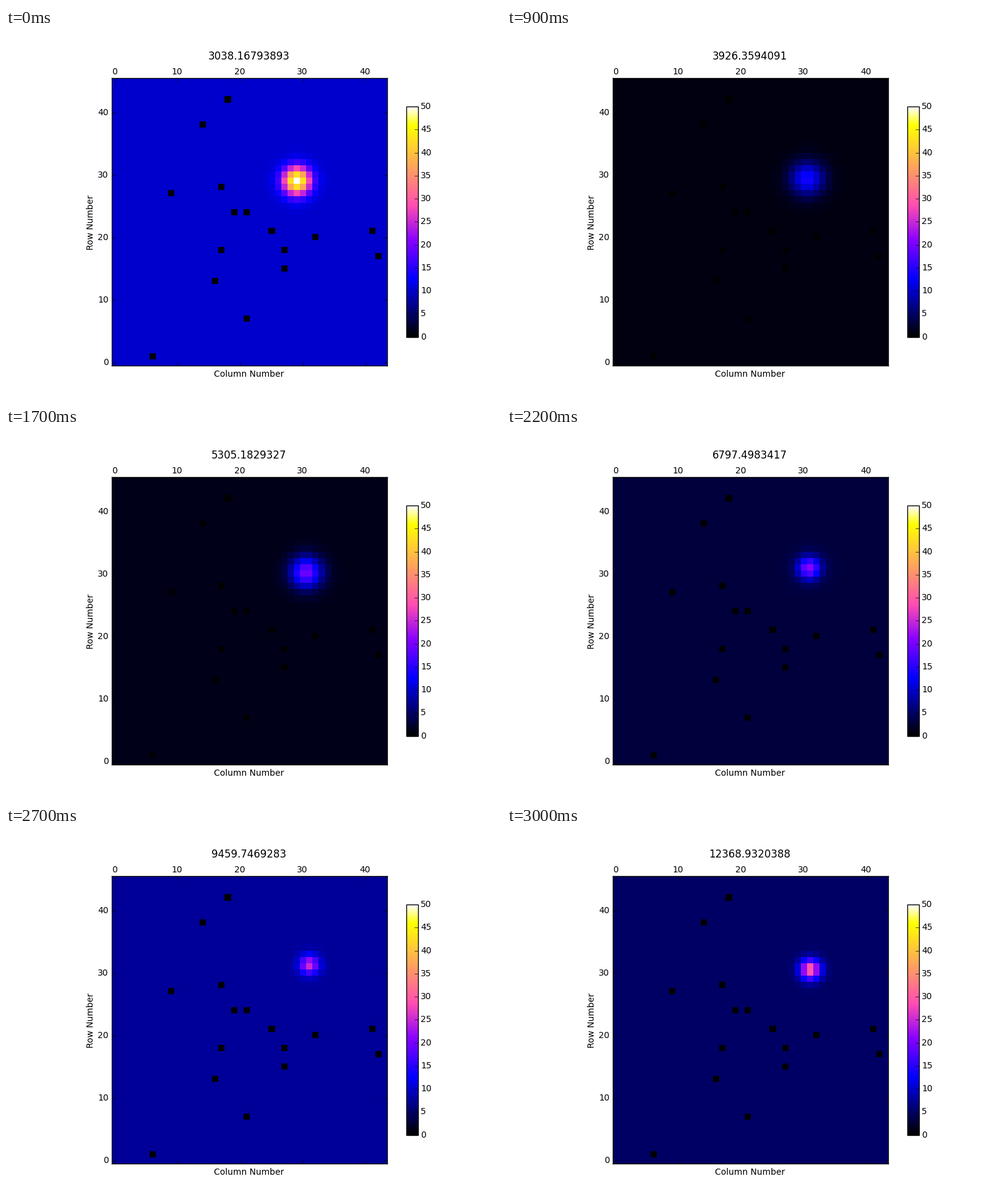
Recreate the animation shown at these times as a matplotlib script. Size 800 by 600 pixels, loop 3100 ms.

```python
import numpy as np
import matplotlib.pyplot as plt
from matplotlib.animation import FuncAnimation
from matplotlib.transforms import Affine2D, Bbox, IdentityTransform

plt.style.use("classic")
plt.rcParams.update({
    "font.family": "DejaVu Sans",
    "font.size": 10,
    "figure.facecolor": "white",
    "savefig.facecolor": "white",
})

W, H, DPI = 800, 600, 100
COLS, ROWS = 44, 46
FRAMES, INTERVAL = 31, 100

# Wavelength bins with edges evenly spaced in wavenumber
EDGES = 1 / np.linspace(1 / 3000, 1 / 13000, FRAMES + 1)
CENTERS = (EDGES[:-1] + EDGES[1:]) / 2

DEAD = [(18, 42), (14, 38), (17, 28), (9, 27), (19, 24), (21, 24), (25, 21),
        (41, 21), (32, 20), (17, 18), (27, 18), (42, 17), (27, 15), (16, 13),
        (21, 7), (6, 1)]

col, row = np.meshgrid(np.arange(COLS), np.arange(ROWS))
alive = np.ones((ROWS, COLS))
for c, r in DEAD:
    alive[r, c] = 0


def tween(i, *points):
    return np.interp(i, *zip(*points))


def tween_level(i, *points):
    """Brightness moves evenly in its square root."""
    return tween(i, *((step, value ** 0.5) for step, value in points)) ** 2


def star_field(i):
    sky = tween_level(i, (0, 10), (3, 0.88), (9, 0.88), (17, 1.27),
                      (25, 4.6), (27, 7.5), (30, 4.95))
    height = tween_level(i, (0, 40.4), (3, 1), (9, 13.2), (17, 18.7),
                         (27, 18), (30, 26.5))
    cx = tween(i, (0, 29), (3, 30.5), (17, 30.5), (25, 31))
    cy = tween(i, (0, 29), (9, 29.35), (17, 30.2), (25, 31.3), (27, 31.25),
               (30, 30.5))
    width = tween(i, (0, 1.57), (9, 1.85), (17, 1.75), (25, 1.03), (30, 1.17))
    d2 = (col - cx) ** 2 + (row - cy) ** 2
    return alive * (sky + height * np.exp(-d2 / (2 * width ** 2)))


def add_axes(x, y, w, h):
    return fig.add_axes([x / W, y / H, w / W, h / H])


def nudge(text, dx, dy):
    text.set_transform(text.get_transform() + Affine2D().translate(dx, dy))


fig = plt.figure(figsize=(W / DPI, H / DPI), dpi=DPI)
side = 465
ax_width = side * COLS / ROWS
ax = add_axes(616 - ax_width, 54, ax_width, side)

# The image fills whole pixels, one more than the axes each way
image = ax.imshow(star_field(0), cmap="gnuplot2", vmin=0, vmax=50,
                  origin="lower", interpolation="nearest", aspect="auto",
                  extent=(171, 617, 54, 520), transform=IdentityTransform())
image.set_clip_box(Bbox.from_extents(171, 54, 617, 519))

ax.set_xlim(-0.5, COLS - 0.5)
ax.set_ylim(-0.5, ROWS - 0.5)
ax.set_xticks(range(0, COLS, 10))
ax.set_yticks(range(0, ROWS, 10))
ax.tick_params(top=True, bottom=True, left=True, right=True,
               labeltop=True, labelbottom=False)
for label in ax.get_xticklabels():
    label.set_va("baseline")
    nudge(label, -1, 0)
nudge(ax.set_xlabel("Column Number"), -1, 0)
nudge(ax.set_ylabel("Row Number", va="baseline"), 0, -1)
title = ax.set_title("", fontsize=12, y=1.05, pad=5)
nudge(title, -1, 0)

bar_ax = add_axes(647, 100.5, 18.6, 372.4)
bar = fig.colorbar(image, cax=bar_ax, ticks=range(0, 51, 5))
bar.ax.tick_params(pad=3.28)


def update(i):
    image.set_data(star_field(i))
    title.set_text(f"{CENTERS[i]:.12g}")
    return image, title


anim = FuncAnimation(fig, update, frames=FRAMES, interval=INTERVAL,
                     repeat=True, repeat_delay=0, blit=False)
plt.show()
```
